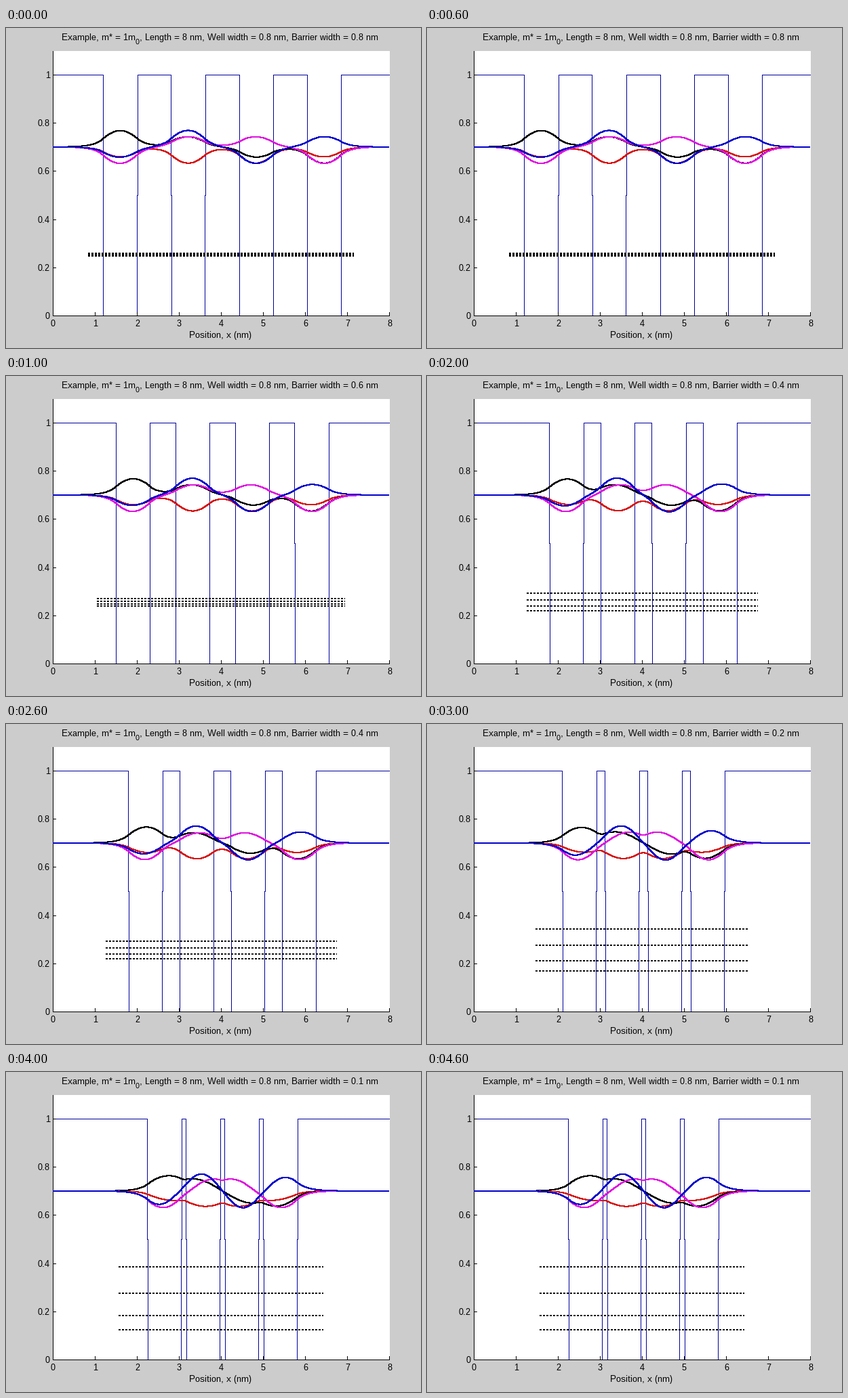
These frames come from a looping animation (612 by 473 pixels, 5 s). A matplotlib script:

```python
import matplotlib.pyplot as plt
import numpy as np
from matplotlib.animation import FuncAnimation
from matplotlib.patches import Rectangle

plt.rcParams.update({
    "font.family": "Liberation Sans",
    "text.hinting": "native",
    "text.hinting_factor": 1,
    "path.simplify": False,
    "path.snap": False,
})

W, H, DPI = 612, 473, 72           # one point equals one pixel
X0, Y0, XS, YS = 69.5, 425.5, 62, 356
LENGTH, WELL, WELLS, N = 8.0, 0.8, 4, 1000
BARRIERS = [0.8, 0.6, 0.4, 0.2, 0.1]
HBAR2_2M = 0.0380998               # eV nm^2
BASE = 0.7
COLORS = ["#d81414", "#000000", "#e014e0", "#0000cc"]
SIGNS = [-1, 1, -1, -1]

x = np.linspace(0, LENGTH, N)
dx = x[1] - x[0]


def px(v):
    return np.floor(X0 + XS * np.asarray(v))


def py(v):
    return np.floor(Y0 - YS * np.asarray(v))


def stairs(xs, ys):
    """Pixel path that steps sideways halfway along each rise."""
    mid = np.floor((ys[:-1] + ys[1:]) / 2)
    sx = np.repeat(xs, 3)[1:-1]
    sy = np.empty(len(sx))
    sy[0::3], sy[1::3], sy[2::3] = ys, mid, mid
    return sx, sy


def samples(length):
    return int(length / LENGTH * N + 0.5 + 1e-9)


def solve(barrier):
    """Potential, level ends, lowest energies and states of the chain."""
    edge = (LENGTH - WELLS * WELL - (WELLS - 1) * barrier) / 2
    well, gap = samples(WELL) + 1, samples(barrier) + 1
    first = samples(edge)
    v = np.ones(N)
    for k in range(WELLS):
        start = first + k * (well + gap)
        v[start:start + well] = 0
    t = HBAR2_2M / dx ** 2
    off = np.full(N - 1, -t)
    ham = np.diag(v + 2 * t) + np.diag(off, 1) + np.diag(off, -1)
    energy, states = np.linalg.eigh(ham)
    probe = first + well // 2
    psi = [s * states[:, k] * np.sign(states[probe, k])
           for k, s in enumerate(SIGNS)]
    lo = int(0.7 * first)
    return v, x[[lo, N - lo]], energy[:WELLS], psi


solutions = [solve(b) for b in BARRIERS]

fig = plt.figure(figsize=(W / DPI, H / DPI), dpi=DPI, facecolor="#cccccc")
ax = fig.add_axes([0, 0, 1, 1])
ax.set(xlim=(0, W), ylim=(H, 0))
ax.axis("off")


def line(xs, ys, color="black", width=1, **kw):
    return ax.plot(xs, ys, color=color, lw=width, antialiased=False,
                   solid_capstyle="butt", dash_capstyle="butt",
                   solid_joinstyle="miter", **kw)[0]


def label(xp, yp, text, size=13, ha="left"):
    return ax.text(xp, yp, text, fontsize=size, ha=ha, va="baseline")


ax.add_patch(Rectangle((69, 34), 497, 392, fc="white", ec="none",
                       antialiased=False))
wall = line([], [], "#000099")
line([69.5, 69.5], [34, 426])
line([69, 566], [425.5, 425.5])
for k in range(9):
    xp = X0 + XS * k
    line([xp, xp], [420, 426])
    label(xp, 441, str(k), ha="center")
for k in range(6):
    yp = py(k / 5) + 0.5
    line([69, 74], [yp, yp])
    label(65, yp + 4.5, f"{k / 5:g}", ha="right")
label(316, 458, "Position, x (nm)", ha="center")
label(82, 18, "Example, m* = 1m")
label(191, 24, "0", size=11)
title = label(197, 18, "")

levels = [line([], [], width=2, ls=(0, (1, 1))) for _ in range(WELLS)]
waves = [line([], [], c, 2) for c in COLORS]


def update(i):
    v, ends, energy, psi = solutions[i]
    title.set_text(f", Length = 8 nm, Well width = {WELL} nm, "
                   f"Barrier width = {BARRIERS[i]} nm")
    sx, sy = stairs(px(x), py(v))
    wall.set_data(sx + 0.5, sy + 0.5)
    for lev, e in zip(levels, energy):
        lev.set_data(px(ends), [py(e)] * 2)
    for wave, p in zip(waves, psi):
        wave.set_data(*stairs(px(x), py(BASE + p)))
    return [title, wall, *levels, *waves]


anim = FuncAnimation(fig, update, frames=len(BARRIERS), interval=1000,
                     repeat=True, repeat_delay=0, blit=False)
plt.show()
```
